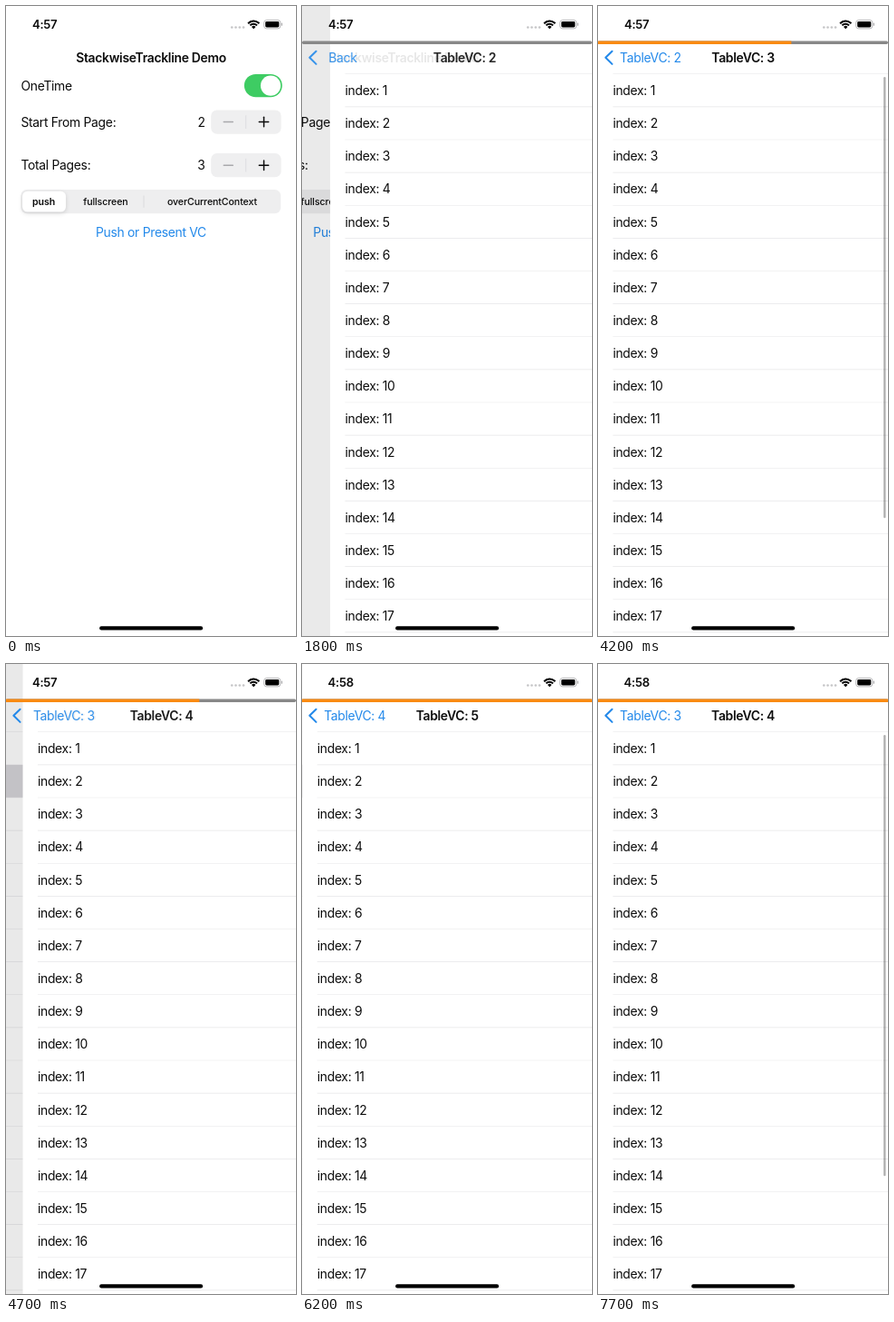
Write an HTML page with a canvas that moves like this. It is 320 by 693 pixels and loops after 8 s.

```html
<!DOCTYPE html>
<html lang="en">
<head>
<meta charset="utf-8">
<title>Navigation demo</title>
<style>
html, body { margin: 0; width: 100%; height: 100%; overflow: hidden; background: #fff; }
canvas { display: block; width: 320px; height: 693px; }
</style>
</head>
<body>
<canvas id="stage"></canvas>
<script>
const canvas = document.getElementById('stage');
const ctx = canvas.getContext('2d');
const dpr = window.devicePixelRatio || 1;
canvas.width = 320 * dpr;
canvas.height = 693 * dpr;

// Layout is in points of a 390 x 844 phone screen.
const W = 390, H = 844, SCALE_X = 320 / W * dpr, SCALE_Y = 693 / H * dpr;
const BLUE = '#2389ea', INK = '#0c0c0c', BACK_X = 29.3;
const LOOP = 8000, STEP = 100;
const moves = [
  { touch: 1200, start: 1585, from: 1, to: 2 },
  { touch: 3300, start: 3350, from: 2, to: 3 },
  { touch: 4450, start: 4450, from: 3, to: 4 },
  { touch: 5600, start: 5690, from: 4, to: 5 },
  { touch: 6850, start: 6850, from: 5, to: 4 }
];

const clamp = x => Math.min(1, Math.max(0, x));
const ramp = (t, a, b) => clamp((t - a) / (b - a));
const ease = x => x * x * (3 - 2 * x);
const mix = (a, b, p) => a + (b - a) * p;

// Critically damped spring
function spring(ms) {
  const x = 0.01826 * Math.max(0, ms);
  return ms > 600 ? 1 : 1 - (1 + x) * Math.exp(-x);
}

function setFont(size, weight, spacing) {
  ctx.font = `${weight} ${size}px Inter, sans-serif`;
  ctx.letterSpacing = spacing + 'px';
}

function text(s, x, cy, o = {}) {
  const { size = 17, weight = 400, color = INK, align = 'left', alpha = 1, spacing = -0.4 } = o;
  setFont(size, weight, spacing);
  ctx.globalAlpha = alpha;
  ctx.fillStyle = color;
  ctx.textAlign = align;
  ctx.fillText(s, x, cy + size * 0.363);
  ctx.globalAlpha = 1;
}

function rect(x, y, w, h, color, r = 0) {
  ctx.fillStyle = color;
  ctx.beginPath();
  ctx.roundRect(x, y, w, h, r);
  ctx.fill();
}

function disc(x, y, r, color) {
  rect(x - r, y - r, 2 * r, 2 * r, color, r);
}

function stepper(label, value, cy) {
  text(label, 20, cy);
  text(value, 262.6, cy, { align: 'center' });
  rect(275.7, cy - 16, 94.3, 32, '#efeff0', 8);
  rect(322.2, cy - 9, 1, 18, '#d9d9dc');
  rect(292, cy - 0.9, 14, 1.8, '#a9a9ac', 1);
  rect(339.5, cy - 0.9, 14.5, 1.8, INK, 1);
  rect(345.9, cy - 7.2, 1.8, 14.5, INK, 1);
}

function home(pressed) {
  text('OneTime', 20, 106.8);
  rect(320.4, 91.2, 51, 31, '#3ecc63', 15.5);
  disc(355.9, 106.7, 13.5, '#fff');
  stepper('Start From Page:', '2', 155.3);
  stepper('Total Pages:', '3', 213.3);

  rect(20, 246, 349.5, 32, '#eeeeef', 8);
  ctx.shadowColor = 'rgba(0,0,0,.14)';
  ctx.shadowBlur = 6 * SCALE_X;
  ctx.shadowOffsetY = 2 * SCALE_Y;
  rect(22, 248, 58.5, 28, '#fff', 7);
  ctx.shadowColor = 'transparent';
  rect(184.8, 254, 1, 16, '#d6d6d9');
  const seg = { size: 13, weight: 500, align: 'center', spacing: -0.15 };
  text('push', 50.7, 262.2, { ...seg, weight: 600 });
  text('fullscreen', 134, 262.2, seg);
  text('overCurrentContext', 277.2, 262.2, seg);

  text('Push or Present VC', 195, 302.7, { color: BLUE, align: 'center', alpha: pressed ? 0.25 : 1 });
}

function table(selected, scrollAlpha) {
  for (let i = 0; i < 18; i++) {
    const y = 91 + 44 * i;
    if (selected && i === 1) rect(0, y, W, 44, '#d5d4d9');
    else rect(20, y - 0.4, W - 20, 0.8, '#e6e6e8');
    text('index: ' + (i + 1), 20, y + 22.3);
  }
  rect(384, 95, 3, 591, `rgba(0,0,0,${0.3 * scrollAlpha})`, 1.5);
}

function page(n, x, opts) {
  ctx.save();
  ctx.translate(x, 0);
  rect(0, 0, W, H, '#fff');
  if (n === 1) home(opts.selected);
  else table(opts.selected, opts.scroll);
  ctx.restore();
}

const titleOf = n => n === 1 ? 'StackwiseTrackline Demo' : 'TableVC: ' + n;
const backOf = n => n === 2 ? 'Back' : titleOf(n - 1);

function title(n, x, alpha) {
  text(titleOf(n), x, 69.3, { weight: 600, alpha });
}

function titleX(n) {
  setFont(17, 600, -0.4);
  return 195 - ctx.measureText(titleOf(n)).width / 2;
}

function back(n, x, alpha) {
  text(backOf(n), x, 69.3, { color: BLUE, alpha });
}

function navBar(low, high, p) {
  const slideX = mix(titleX(low), BACK_X, p);
  title(low, slideX, 1 - p);
  if (low > 1) back(low, BACK_X - 125 * p, 1 - p);
  title(high, titleX(high) + 244 * (1 - p), p);
  back(high, slideX, p);

  ctx.globalAlpha = low === 1 ? p : 1;
  ctx.strokeStyle = BLUE;
  ctx.lineWidth = 2.5;
  ctx.lineCap = ctx.lineJoin = 'round';
  ctx.beginPath();
  ctx.moveTo(19, 60.6);
  ctx.lineTo(10.2, 69.2);
  ctx.lineTo(19, 77.8);
  ctx.stroke();
  ctx.globalAlpha = 1;
}

const share = n => clamp((n - 1) / 3);

function progress(value) {
  rect(0, 47, W, 4, '#888', 2);
  rect(0, 47, W * value, 4, '#f98a12');
}

function statusBar(clock) {
  text(clock, 52, 24.6, { size: 16, weight: 600, align: 'center', spacing: -0.3 });
  for (let i = 0; i < 4; i++) disc(303.8 + i * 5.2, 28.6, 1.6, '#c6c6c8');

  ctx.strokeStyle = ctx.fillStyle = '#000';
  ctx.lineCap = 'butt';
  ctx.lineWidth = 2.5;
  for (const r of [10.2, 6.4]) {
    ctx.beginPath();
    ctx.arc(333, 30.4, r, -Math.PI * 0.76, -Math.PI * 0.24);
    ctx.stroke();
  }
  ctx.beginPath();
  ctx.moveTo(333, 30.6);
  ctx.arc(333, 30.4, 3.7, -Math.PI * 0.76, -Math.PI * 0.24);
  ctx.fill();

  ctx.strokeStyle = '#a9a9ab';
  ctx.lineWidth = 1;
  ctx.beginPath();
  ctx.roundRect(347, 18.9, 22, 11.4, 3.4);
  ctx.stroke();
  rect(348.8, 20.7, 18.4, 7.8, '#000', 1.8);
  rect(370.2, 22.6, 1.4, 4, '#a9a9ab', 0.7);
}

function draw(t) {
  const m = moves.filter(v => v.touch <= t).pop() || moves[0];
  const since = t - m.start;
  const push = m.to > m.from;
  const low = Math.min(m.from, m.to), high = Math.max(m.from, m.to);
  const p = push ? spring(since) : 1 - spring(since);
  const fresh = ramp(since, 750, 850);
  const pressed = t >= m.touch && (m.from > 1 || since < 0);

  ctx.setTransform(SCALE_X, 0, 0, SCALE_Y, 0, 0);
  rect(0, 0, W, H, '#fff');
  page(low, -0.3 * W * p, { selected: push && pressed, scroll: push ? 1 : fresh });
  rect(0, 0, W, H, `rgba(0,0,0,${0.09 * p})`);
  if (p > 0) page(high, W * (1 - p), { scroll: push ? fresh : 1 });

  navBar(low, high, p);
  if (t >= moves[0].start) progress(mix(share(m.from), share(m.to), ease(ramp(since, 500, 800))));
  statusBar(t < 5900 ? '4:57' : '4:58');
  rect(125.7, 831, 139, 5, t >= 5300 && t < 5600 ? '#7c7c7c' : '#000', 2.5);
}

function frame() {
  const t = (performance.now() + 4) % LOOP;
  draw(Math.floor(t / STEP) * STEP);
  requestAnimationFrame(frame);
}
frame();
</script>
</body>
</html>
```
